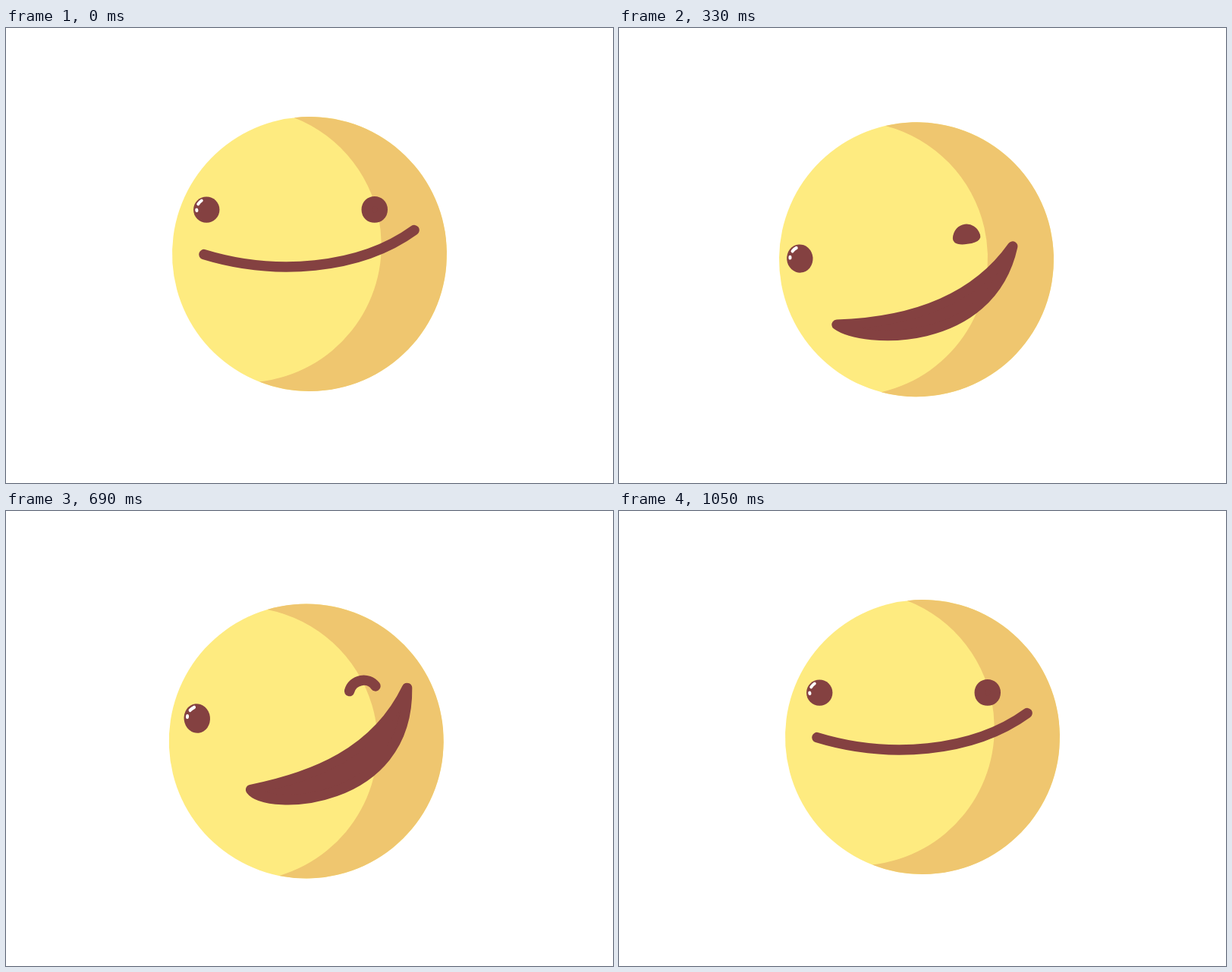
An HTML page with a canvas that plays this animation: 800 px wide and 600 px high, repeating every 1440 ms.

```html
<!DOCTYPE html>
<html lang="en">
<head>
<meta charset="utf-8">
<title>Winking ball</title>
<style>
  html, body { margin: 0; width: 100%; height: 100%; overflow: hidden; background: #fff; }
  canvas { display: block; width: 800px; height: 600px; }
</style>
</head>
<body>
<canvas id="stage" width="800" height="600"></canvas>
<script>
const ctx = document.getElementById('stage').getContext('2d');
const LOOP = 1440, STEP = 30;
const UP = 150, LOW = 570, BLINK = 810;
const LIGHT = '#feeb80', SHADE = '#efc66f', DARK = '#844141';
const RADIUS = 181, SHIFT = 87, EYE_GAP = 221.5, STROKE = 13.5;

const rad = deg => deg * Math.PI / 180;
const mix = (a, b, u) => a + (b - a) * u;

// Ease in and out; a bias above 1 covers more ground early.
function ease(u, bias = 1) {
  const w = 1 - (1 - Math.min(1, Math.max(0, u))) ** bias;
  return w * w * (3 - 2 * w);
}

// A value that lifts, falls to its low pose, then returns to rest.
function channel(rest, up, low, fall, { start = LOW, end = BLINK, bias = 1 } = {}) {
  return t => {
    if (t < UP) return mix(rest, up, ease(t / UP));
    if (t < start) return mix(up, low, ease((t - UP) / (LOW - UP), fall));
    return mix(low, rest, ease((t - start) / (end - start), bias));
  };
}

const lateReturn = { start: 660, end: 1050, bias: 1.15 };
const rig = {
  bodyX: channel(400, 395.5, 391.5, 2.7),
  bodyY: channel(298, 291.5, 309, 2.15),
  eyesX: channel(-25, -29.3, -45.5, 2.9),
  eyesY: channel(239.6, 208.5, 316.5, 2, { bias: 1.95 }),
  eyesTilt: channel(0, 4.4, -17.5, 1.35, { end: 860 }),
  mouthX: channel(-0.5, -7.5, 30.5, 1.2, lateReturn),
  mouthY: channel(282.6, 254, 357, 2.4, { bias: 1.65 }),
  mouthTilt: channel(-6.6, -2.5, -40.6, 1.4, { start: 620, end: 850 }),
  mouthOpen: channel(0, 0, 1, 2, lateReturn),
  wink: t => t < BLINK ? ease((t - UP) / (LOW - UP)) : 0
};

function placed(x, y, tilt, paint) {
  ctx.save();
  ctx.translate(x, y);
  ctx.rotate(rad(tilt));
  paint();
  ctx.restore();
}

// Round-edged shape between two curves that share their ends.
function lens(half, top, bottom) {
  ctx.fillStyle = ctx.strokeStyle = DARK;
  ctx.lineWidth = STROKE;
  ctx.beginPath();
  ctx.moveTo(-half, 0);
  ctx.bezierCurveTo(...top[0], ...top[1], half, 0);
  ctx.bezierCurveTo(...bottom[1], ...bottom[0], -half, 0);
  ctx.closePath();
  ctx.fill();
  ctx.stroke();
}

function body() {
  const q = Math.acos(SHIFT / 2 / RADIUS);
  ctx.fillStyle = LIGHT;
  ctx.beginPath();
  ctx.arc(0, 0, RADIUS, 0, 2 * Math.PI);
  ctx.fill();
  ctx.fillStyle = SHADE;
  ctx.beginPath();
  ctx.arc(0, 0, RADIUS, q - Math.PI, Math.PI - q);
  ctx.arc(-SHIFT, 0, RADIUS, q, -q, true);
  ctx.fill();
}

function mouth(open) {
  const length = 279 - 34 * open;
  const point = (along, depth) => [(along - 0.5) * length, depth];
  lens(length / 2,
    [point(0.32, 39 - 8 * open), point(0.72 - 0.05 * open, 44 + 5 * open)],
    [point(0.32 - 0.32 * open, 39 - 4 * open), point(0.72 - 0.06 * open, 44 + 90 * open)]);
}

function leftEye(tilt) {
  const r = 17.2, tall = r + 0.19 * Math.max(0, -tilt);
  ctx.fillStyle = DARK;
  ctx.beginPath();
  ctx.ellipse(0, 0, r, tall, rad(0.6 * tilt), 0, 2 * Math.PI);
  ctx.fill();
  ctx.scale(1, tall / r);
  ctx.rotate(rad(-1.15 * tilt));
  ctx.strokeStyle = '#fff';
  ctx.lineWidth = 4;
  ctx.beginPath();
  ctx.moveTo(-11, -7.3);
  ctx.quadraticCurveTo(-9.3, -10.2, -6.5, -12);
  ctx.moveTo(-13, 0);
  ctx.lineTo(-12.8, 1.4);
  ctx.stroke();
}

// The lower lid rises to the upper one until only an arch is left.
function rightEye(tilt, wink) {
  const half = 10.5 + 7 * wink * wink;
  const lift = Math.min(14.5, 8 + 1.25 * (tilt + 17.5));
  const lid = (h, lean) => [[-half + lean, h], [half - lean, h]];
  ctx.translate(0, 3 * wink);
  lens(half, lid(-lift, 7 * wink), lid(mix(14, -lift, wink), 7 * wink));
}

function draw(t) {
  const pose = {};
  for (const name in rig) pose[name] = rig[name](t);
  const { bodyX, bodyY, eyesX, eyesY, eyesTilt, mouthX, mouthY, mouthTilt, mouthOpen, wink } = pose;

  ctx.fillStyle = '#fff';
  ctx.fillRect(0, 0, 800, 600);
  placed(bodyX, bodyY, 10 + 0.38 * mouthTilt, body);
  placed(bodyX + mouthX, mouthY, mouthTilt, () => mouth(mouthOpen));

  // Both eyes are gone for one step before they reopen.
  if (t === BLINK) return;
  const dx = EYE_GAP / 2 * Math.cos(rad(eyesTilt));
  const dy = EYE_GAP / 2 * Math.sin(rad(eyesTilt));
  const x = bodyX + eyesX;
  placed(x - dx, eyesY - dy, 0, () => leftEye(eyesTilt));
  placed(x + dx, eyesY + dy, eyesTilt, () => rightEye(eyesTilt, wink));
}

ctx.lineCap = ctx.lineJoin = 'round';
const begin = performance.now();
function tick() {
  const t = (performance.now() - begin) % LOOP;
  draw(Math.floor(t / STEP) * STEP);
  requestAnimationFrame(tick);
}
tick();
</script>
</body>
</html>
```
